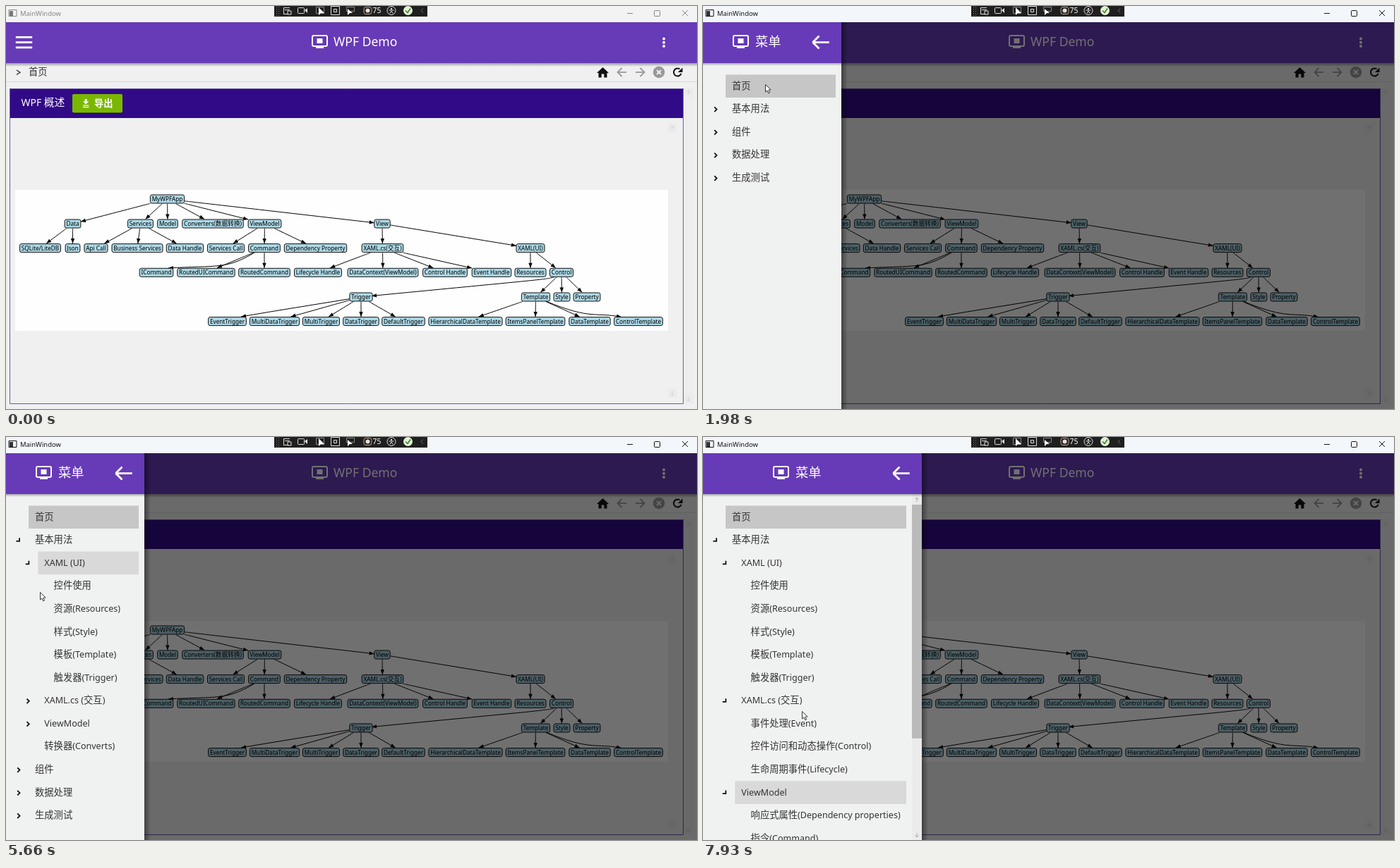
Write an HTML page with a canvas that moves like this. It is 979 by 572 pixels and loops after 7990 ms.

```html
<!DOCTYPE html>
<html lang="zh">
<head>
<meta charset="utf-8">
<title>MainWindow</title>
<style>
html, body { margin: 0; width: 100%; height: 100%; overflow: hidden; background: #f0f0f0; }
canvas { display: block; }
</style>
</head>
<body>
<canvas id="stage" width="979" height="572"></canvas>
<script>
const W = 979, H = 572, LOOP = 7990;
const c = document.getElementById('stage').getContext('2d');
const PURPLE = '#673ab7', INDIGO = '#310a87';
const clamp = v => Math.max(0, Math.min(1, v));
const smooth = v => v * v * (3 - 2 * v);
const span = (t, from, length) => clamp((t - from) / length);

function rect(x, y, w, h, fill, r = 0) {
  c.fillStyle = fill;
  c.beginPath();
  c.roundRect(x, y, w, h, r);
  c.fill();
}
function frame(x, y, w, h, color, width = 1, r = 0) {
  c.strokeStyle = color;
  c.lineWidth = width;
  c.beginPath();
  c.roundRect(x, y, w, h, r);
  c.stroke();
}
function dot(x, y, r, fill) {
  c.fillStyle = fill;
  c.beginPath();
  c.arc(x, y, r, 0, 7);
  c.fill();
}
function line(color, width, ...p) {
  c.strokeStyle = color;
  c.lineWidth = width;
  c.beginPath();
  for (let i = 0; i < p.length; i += 2) c.lineTo(p[i], p[i + 1]);
  c.stroke();
}
function poly(fill, ...p) {
  c.fillStyle = fill;
  c.beginPath();
  for (let i = 0; i < p.length; i += 2) c.lineTo(p[i], p[i + 1]);
  c.closePath();
  c.fill();
}
function fade(x, y, w, h, alpha, vertical) {
  const g = c.createLinearGradient(x, y, vertical ? x : x + w, vertical ? y + h : y);
  g.addColorStop(0, `rgba(0,0,0,${alpha})`);
  g.addColorStop(1, 'rgba(0,0,0,0)');
  rect(x, y, w, h, g);
}

// Latin runs are set slightly smaller than the Chinese ones.
function runs(text, size, weight = 400) {
  return text.match(/[\u3000-\u9fff]+|[^\u3000-\u9fff]+/g).map(part => {
    const cjk = part.charCodeAt(0) > 0x2fff;
    const font = cjk
      ? `${weight} ${size}px "Noto Sans CJK SC", "Noto Sans CJK", sans-serif`
      : `${weight} ${size * .945}px "Noto Sans", "Open Sans", sans-serif`;
    c.font = font;
    return { part, font, width: c.measureText(part).width };
  });
}
const textWidth = list => list.reduce((sum, r) => sum + r.width, 0);
function write(text, x, y, size, color, weight, centered) {
  const list = runs(text, size, weight);
  if (centered) x -= textWidth(list) / 2;
  c.fillStyle = color;
  for (const r of list) {
    c.font = r.font;
    c.fillText(r.part, x, y);
    x += r.width;
  }
}

// ---- Diagram ----
const LEVEL_Y = [274, 309, 343.6, 378.3, 413, 447.6];
const node = (label, x, ...children) => ({ label, x, children });
const tree = node('MyWPFApp', 228.5,
  node('Data', 94.5, node('SQLite/LiteDB', 48.5), node('Json', 94.5)),
  node('Services', 190.5, node('Api Call', 127.5), node('Business Services', 186), node('Data Handle', 253.5)),
  node('Model', 229),
  node('Converters(数据转换)', 293),
  node('ViewModel', 366.5,
    node('Services Call', 311.5),
    node('Command', 366, node('ICommand', 213), node('RoutedUICommand', 283.5), node('RoutedCommand', 366)),
    node('Dependency Property', 438.5)),
  node('View', 533,
    node('XAML.cs(交互)', 533.5, node('Lifecycle Handle', 442), node('DataContext(ViewModel)', 534),
      node('Control Handle', 622), node('Event Handle', 688)),
    node('XAML(UI)', 743,
      node('Resources', 743),
      node('Control', 787,
        node('Trigger', 503, node('EventTrigger', 313.5), node('MultiDataTrigger', 380.5),
          node('MultiTrigger', 446.5), node('DataTrigger', 503), node('DefaultTrigger', 563)),
        node('Template', 750.5, node('HierarchicalDataTemplate', 651), node('ItemsPanelTemplate', 750),
          node('DataTemplate', 827), node('ControlTemplate', 896)),
        node('Style', 787.5),
        node('Property', 823)))));
const bends = {
  ICommand: [352, 350, 312, 374, 300, 368, 230, 372],
  ControlTemplate: [765, 419, 830, 446, 835, 434, 872, 441.5],
  Trigger: [777, 384.5, 768, 388, 760, 388, 518, 411.5],
  EventTrigger: [488, 415.5, 436, 424, 385, 432, 333, 441],
};

function place(n, depth) {
  n.y = LEVEL_Y[depth];
  n.w = textWidth(runs(n.label, 8.7)) + 4.5;
  n.children.forEach(k => place(k, depth + 1));
}
function border(n, dx, dy) {
  const k = Math.min(n.w / 2 / Math.abs(dx || 1e-6), 6.5 / Math.abs(dy));
  return [n.x + dx * k, n.y + dy * k];
}
function edge(a, b) {
  const dx = b.x - a.x, dy = b.y - a.y;
  let p = bends[b.label];
  if (!p) {
    const s = border(a, dx, dy), e = border(b, -dx, -dy);
    p = [...s, ...s, ...s, ...e];
  }
  c.strokeStyle = '#000';
  c.lineWidth = 1;
  c.beginPath();
  c.moveTo(p[0], p[1]);
  c.bezierCurveTo(...p.slice(2));
  c.stroke();
  c.save();
  c.translate(p[6], p[7]);
  c.rotate(Math.atan2(p[7] - p[5], p[6] - p[4]));
  poly('#000', 0, 0, -7, -2.7, -7, 2.7);
  c.restore();
}
function drawTree(n) {
  for (const k of n.children) {
    edge(n, k);
    drawTree(k);
  }
  const x = n.x - n.w / 2, y = n.y - 6;
  rect(x, y, n.w, 12, '#add8e6', 2.5);
  frame(x, y, n.w, 12, '#111', 1, 2.5);
  write(n.label, n.x, n.y + 3, 8.7, '#000', 400, true);
}

// ---- Window ----
function monitor(x) {
  frame(x + 1, 42, 21, 15, '#fff', 2, 2);
  rect(x + 7.5, 46, 8, 7, '#fff');
  rect(x + 6, 57, 11, 3, '#fff');
}
function smallArrow(x, y, dir, color) {
  line(color, 1, x, y - 3, x, y + 3);
  line(color, 1, x - 2.5, y + dir * .5, x, y + dir * 3, x + 2.5, y + dir * .5);
}
function titleBar(active) {
  const ink = active ? '#111' : '#858585';
  rect(0, 0, W, 23, active ? '#f3f6fb' : '#f3f3f3');
  frame(4, 5.5, 11, 9, ink);
  rect(5, 7, 5, 7, active ? '#333' : '#777');
  write('MainWindow', 20, 13.8, 10, ink);
  line(ink, 1, 880, 10.5, 888, 10.5);
  frame(918.5, 6.5, 8, 8, ink, 1, 1);
  line(ink, 1, 958, 6, 966, 14);
  line(ink, 1, 966, 6, 958, 14);

  rect(380, 0, 217, 15, '#1f1f1f');
  for (let i = 0; i < 10; i++) rect(383 + i % 2 * 3, 1 + (i >> 1) * 3, 1, 1, '#777');
  const pale = '#ddd';
  line(pale, 1, 400, 11.5, 393.5, 11.5, 393.5, 2.5, 402, 2.5);
  line(pale, 1, 395, 5.5, 402, 5.5);
  frame(399, 7, 5, 5, pale);
  frame(413.5, 2.5, 9, 8, pale, 1, 1);
  poly(pale, 423, 6, 427, 3, 427, 10);
  frame(439.5, 1.5, 11, 9, '#888');
  poly('#fff', 443, 2, 443, 13, 446, 10, 451, 10);
  frame(460.5, .5, 12, 12, pale);
  frame(464.5, 4.5, 4, 4, pale);
  frame(482.5, 1.5, 11, 6, '#888');
  poly('#fff', 484, 4, 484, 13, 487, 10, 491, 10);
  frame(507, 1.5, 11, 10, '#c9a389', 1, 3);
  dot(512.5, 6.5, 3, pale);
  write('75', 519.5, 10, 11, '#fff');
  c.strokeStyle = pale;
  c.beginPath();
  c.arc(546, 6.5, 6, 0, 7);
  c.stroke();
  dot(546, 4, 1.2, pale);
  line(pale, 1, 542.5, 6, 549.5, 6);
  line(pale, 1, 544, 10.5, 546, 7, 548, 10.5);
  dot(569.5, 6.5, 6.5, '#e4efd9');
  line('#3c8c25', 1.7, 566, 6.5, 569, 9.5, 573, 3.5);
  line('#777', 1, 591, 3.5, 588, 6.5, 591, 9.5);
}
function navArrow(x, dir) {
  line('#999', 1.8, x - dir * 6.5, 94, x + dir * 6, 94);
  line('#999', 1.8, x, 88, x + dir * 6, 94, x, 100);
}
function page(t) {
  rect(0, 23, W, H - 23, '#f0f0f0');
  rect(0, 23, W, 58, PURPLE);
  fade(0, 81, W, 5, .35, true);
  menuIcon(25.5, toggle(t));
  monitor(433);
  write('WPF Demo', 464, 57, 18.6, '#fff');
  for (const y of [46.5, 51.7, 57]) dot(932, y, 2, '#fff');

  line('#222', 1.2, 15, 91, 20, 94.3, 15, 97.6);
  write('首页', 32, 98, 13.3, '#333');
  poly('#111', 837, 95, 845.5, 87, 854, 95, 851.5, 95, 851.5, 101.5, 847.3, 101.5,
    847.3, 96.5, 843.7, 96.5, 843.7, 101.5, 839.5, 101.5, 839.5, 95);
  navArrow(872.5, -1);
  navArrow(898.5, 1);
  dot(925, 94, 8.3, '#999');
  line('#f0f0f0', 2, 922, 91, 928, 97);
  line('#f0f0f0', 2, 928, 91, 922, 97);
  c.strokeStyle = '#111';
  c.lineWidth = 2;
  c.beginPath();
  c.arc(951.5, 94, 5.5, .35, 5.3);
  c.stroke();
  poly('#111', 958.5, 87.5, 958.5, 94, 952, 94);
  rect(0, 107, W, 1, '#d9d9d9');

  rect(960, 116, 14, 450, '#eeeeee');
  rect(5, 117, 955, 42, INDIGO);
  frame(5.5, 117.5, 954, 447, '#6a5ba8');
  write('WPF 概述', 21.5, 142, 14.8, '#fff');
  rect(94, 126, 71, 27, 'rgba(0,0,0,.3)', 2);
  rect(94, 125, 71, 26.5, '#79b800', 2);
  rect(111.7, 132, 3, 4, '#fff');
  poly('#fff', 109, 135.5, 117.4, 135.5, 113.2, 139.5);
  rect(109, 140.5, 8.5, 1.2, '#fff');
  rect(109, 143, 8.5, 1.2, '#fff');
  write('导出', 125, 142.5, 13.3, '#fff', 700);
  for (const [x, y, d] of [[944, 173, -1], [944, 549.5, 1], [967, 123, -1], [967, 558, 1]]) {
    rect(x - 6.5, y - 6.5, 13, 13, '#ebebeb');
    smallArrow(x, y, d, '#d2d2d2');
  }
  rect(13, 261, 925, 200, '#fefefe');
  drawTree(tree);
}

// ---- Drawer ----
const ROW = 32.58, OPEN = [3150, 4890, 6330, 7670], NEVER = 1e9;
// label, level, visible from, chevron turns at
const MENU = [
  ['首页', 0, 0],
  ['基本用法', 0, 0, 3150],
  ['XAML (UI)', 1, OPEN[0], 4915],
  ['控件使用', 2, OPEN[1]],
  ['资源(Resources)', 2, OPEN[1]],
  ['样式(Style)', 2, OPEN[1]],
  ['模板(Template)', 2, OPEN[1]],
  ['触发器(Trigger)', 2, OPEN[1]],
  ['XAML.cs (交互)', 1, OPEN[0], 6250],
  ['事件处理(Event)', 2, OPEN[2]],
  ['控件访问和动态操作(Control)', 2, OPEN[2]],
  ['生命周期事件(Lifecycle)', 2, OPEN[2]],
  ['ViewModel', 1, OPEN[0], 7670],
  ['响应式属性(Dependency properties)', 2, OPEN[3]],
  ['指令(Command)', 2, OPEN[3]],
  ['数据绑定(Binding)', 2, OPEN[3]],
  ['转换器(Converts)', 1, OPEN[0]],
  ['组件', 0, 0, NEVER],
  ['数据处理', 0, 0, NEVER],
  ['生成测试', 0, 0, NEVER],
];
const FOCUS = [[2930, '基本用法'], [4560, 'XAML (UI)'], [6130, 'XAML.cs (交互)'], [7480, 'ViewModel']];
const toggle = t => span(t, 1434, 300);

// Three bars that turn half round and close into an arrow.
function menuIcon(x, q) {
  const m = q * q * q * (q < 1 ? .7 : 1);
  const mix = (a, b) => a + (b - a) * m;
  c.save();
  c.translate(x, 51.6);
  c.rotate(Math.PI * q);
  line('#fff', 2.8, -11.7, 0, 11.7, 0);
  for (const s of [-1, 1]) line('#fff', 2.8, mix(-11.7, 2.5), s * mix(7.3, 9), mix(11.7, 11.5), s * mix(7.3, 0));
  c.restore();
}
function chevron(x, y, turn) {
  c.save();
  c.translate(x, y);
  c.rotate(turn * Math.PI / 4);
  line('#111', 1.8, -1.8, -3.3, 1.5, 0, -1.8, 3.3);
  c.restore();
}
function drawer(t) {
  const shown = smooth(span(t, 1510, 380));
  if (!shown) return;
  const w = t < OPEN[2] ? 196 : t < OPEN[3] ? 270 : 310;
  const scrolls = w > 196;
  const right = w - (scrolls ? 22 : 8);
  const rows = MENU.filter(r => t >= r[2]);
  const focus = FOCUS.filter(f => t >= f[0]).pop();

  c.save();
  c.translate(-w * (1 - shown), 0);
  fade(w, 23, 9, H - 23, .4, false);
  rect(0, 23, w, H - 23, '#f0f1f1');
  rows.forEach(([label, level, , turns], i) => {
    const top = 97.4 + i * ROW, mid = top + ROW / 2, x = 32 + level * 13.3;
    if (!i) rect(x, top, right - x, ROW, '#c6c6c6');
    else if (focus && focus[1] === label) rect(x, top, right - x, ROW, '#d9d9d9');
    if (turns) chevron(x - 14, mid + .5, span(t, turns, 150));
    write(label, x + 9, mid + 4, 13.3, '#333');
  });
  if (scrolls) {
    const content = rows.length * ROW + 32;
    rect(w - 14, 81, 14, H - 81, '#ebebeb');
    rect(w - 14, 96, 14, 462 * 491 / content, '#bababa');
    smallArrow(w - 7, 89, -1, '#a8a8a8');
    smallArrow(w - 7, 565, 1, '#a8a8a8');
  }
  rect(0, 23, w, 58, PURPLE);
  fade(0, 81, w, 4, .3, true);
  monitor(w / 2 - 56);
  write('菜单', w / 2 - 24, 57, 18.3, '#fff');
  menuIcon(w - 29, toggle(t));
  c.restore();
}

// ---- Pointer ----
const PATH = [
  [400, 929, 553], [1160, 24, 58], [1230, 22, 57], [1650, 22, 57], [1980, 88, 111], [2250, 88, 107],
  [2930, 18, 145], [3150, 18, 145], [3410, 63, 186], [3950, 58, 250], [4600, 33, 181], [4910, 33, 181],
  [5560, 50, 206], [6140, 29, 378], [6500, 29, 378], [6820, 34, 364], [7440, 30, 502], [7670, 30, 502],
  [7930, 140, 389],
];
function pointerAt(t) {
  if (t < 70) return null;
  if (t < 200) return t < 135 ? [880, 8] : [962, 37];
  if (t < PATH[0][0]) return null;
  const i = PATH.findIndex(p => p[0] > t);
  if (i < 0) return PATH[PATH.length - 1].slice(1);
  const [t0, x0, y0] = PATH[i - 1], [t1, x1, y1] = PATH[i];
  const k = smooth((t - t0) / (t1 - t0));
  return [x0 + (x1 - x0) * k, y0 + (y1 - y0) * k];
}
function pointer(t) {
  const at = pointerAt(t);
  if (!at) return;
  c.save();
  c.translate(Math.round(at[0]) + .5, Math.round(at[1]) + .5);
  const shape = [0, 0, 0, 10.5, 2.5, 8.4, 4.2, 12.3, 6, 11.5, 4.4, 7.7, 7.6, 7.4, 0, 0];
  poly('#fff', ...shape);
  line('#222', .9, ...shape);
  c.restore();
}

function draw(t) {
  page(t);
  const dim = .555 * span(t, 1490, 370);
  if (dim) rect(0, 23, W, H - 23, `rgba(0,0,0,${dim})`);
  drawer(t);
  titleBar(t >= 1430);
  pointer(t);
}

place(tree, 0);
const start = performance.now();
function tick() {
  draw((performance.now() - start) % LOOP);
  requestAnimationFrame(tick);
}
tick();
</script>
</body>
</html>
```
